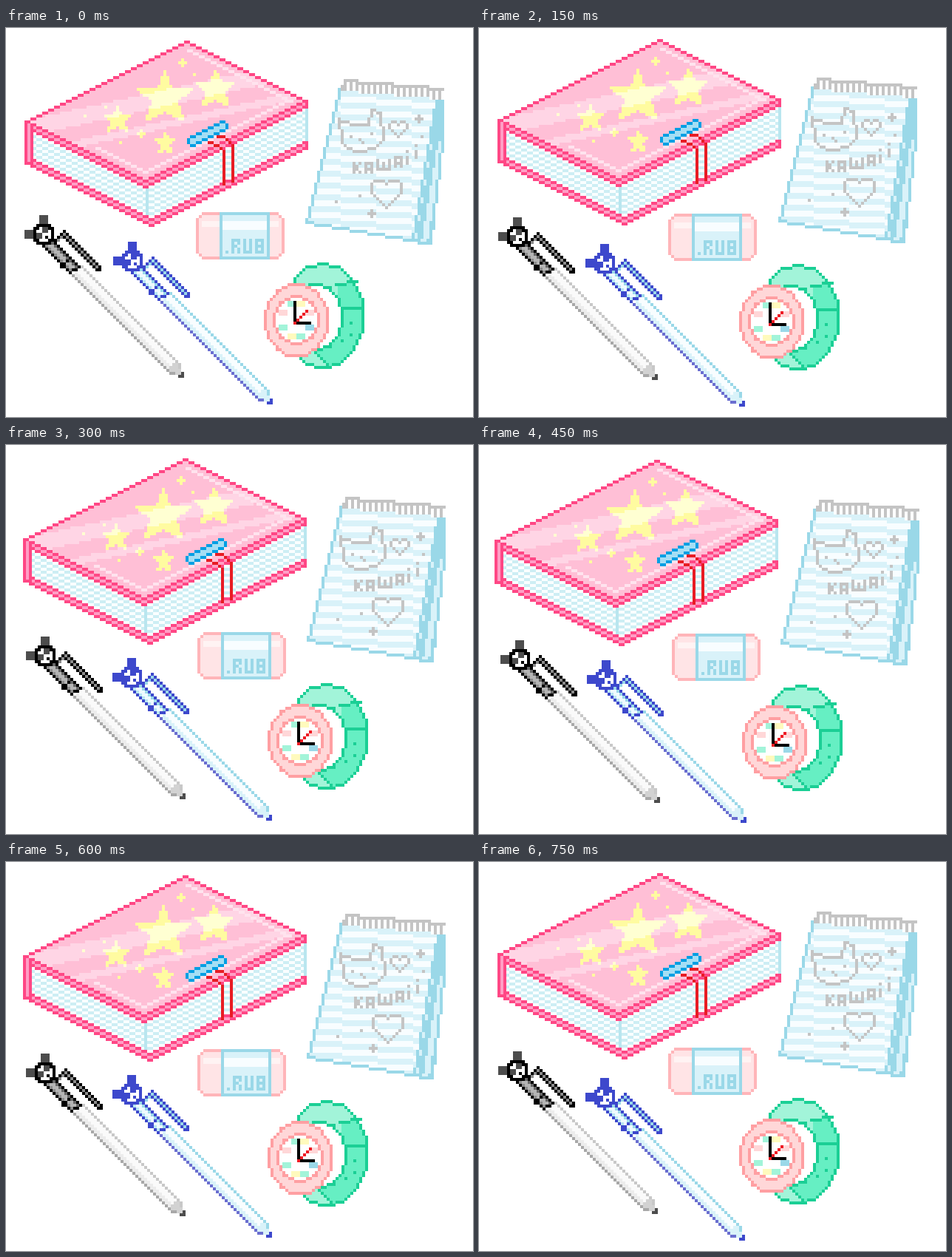
Animation of 632 by 526 pixels, one loop 0.9 s. Source, as an HTML page with a canvas:

```html
<!DOCTYPE html>
<html lang="en">
<head>
<meta charset="utf-8">
<title>Pixel stationery</title>
<style>
  html, body { margin: 0; width: 100%; height: 100%; overflow: hidden; background: #fff; }
  canvas { display: block; }
</style>
</head>
<body>
<canvas id="stage" width="632" height="526"></canvas>
<script>
const CELL = 4, STEP = 150;
const ORDER = [0, 1, 2, 3, 2, 1];
const SKY = '#9ad8e8', ICE = '#d9f2f9', SNOW = '#f8fdff';

const pairs = list => {
  const out = [];
  for (let i = 0; i < list.length; i += 2) out.push([list[i], list[i + 1]]);
  return out;
};

const inside = (pts, x, y) => {
  let hit = false;
  for (let i = 0, j = pts.length - 1; i < pts.length; j = i++) {
    const [ax, ay] = pts[i], [bx, by] = pts[j];
    if ((ay > y) !== (by > y) && x < (bx - ax) * (y - ay) / (by - ay) + ax) hit = !hit;
  }
  return hit;
};

// A grid of coloured cells with simple drawing tools.
class Sprite {
  constructor(w, h) {
    this.w = w;
    this.h = h;
    this.cells = Array.from({ length: h }, () => Array(w).fill(null));
  }
  set(x, y, c) {
    if (x >= 0 && y >= 0 && x < this.w && y < this.h) this.cells[y][x] = c;
  }
  // Gives every cell a new colour from its place and present colour.
  map(rule) {
    this.cells.forEach((row, y) => row.forEach((c, x) => { row[x] = rule(x, y, c); }));
  }
  rect(x, y, w, h, c) {
    for (let j = 0; j < h; j++) for (let i = 0; i < w; i++) this.set(x + i, y + j, c);
  }
  line(x0, y0, x1, y1, c) {
    const n = Math.max(Math.abs(x1 - x0), Math.abs(y1 - y0), 1);
    for (let i = 0; i <= n; i++) {
      this.set(Math.round(x0 + (x1 - x0) * i / n), Math.round(y0 + (y1 - y0) * i / n), c);
    }
  }
  path(list, c, dx = 0, dy = 0) {
    const p = pairs(list);
    for (let i = 1; i < p.length; i++) {
      this.line(p[i - 1][0] + dx, p[i - 1][1] + dy, p[i][0] + dx, p[i][1] + dy, c);
    }
  }
  poly(list, fill, stroke) {
    const pts = pairs(list);
    this.map((x, y, c) => !inside(pts, x, y) ? c : typeof fill === 'function' ? fill(x, y) : fill);
    if (stroke) this.path([...list, list[0], list[1]], stroke);
  }
  // A ring of n points; the radius factor may vary from point to point.
  ring(n, cx, cy, rx, ry, fill, stroke, factor = () => 1) {
    const list = [];
    for (let i = 0; i < n; i++) {
      const a = 2 * Math.PI * i / n - Math.PI / 2, k = factor(i);
      list.push(Math.round(cx + rx * k * Math.cos(a)), Math.round(cy + ry * k * Math.sin(a)));
    }
    this.poly(list, fill, stroke);
  }
  ellipse(cx, cy, rx, ry, fill, stroke) {
    this.ring(48, cx, cy, rx, ry, fill, stroke);
  }
  star(cx, top, r, c) {
    this.ring(10, cx, top + r * 0.95, r, r * 0.95, c, c, i => i % 2 ? 0.42 : 1);
  }
  plus(x, y, c) {
    this.rect(x - 1, y, 3, 1, c);
    this.rect(x, y - 1, 1, 3, c);
  }
  // Two cells across for each cell down.
  iso(x, y, dir, n, c) {
    for (let i = 0; i < n; i++) this.rect(x + 2 * i * dir, y + i, 2, 1, c);
  }
  bake() {
    const cv = document.createElement('canvas');
    cv.width = this.w * CELL;
    cv.height = this.h * CELL;
    const g = cv.getContext('2d');
    this.cells.forEach((row, y) => row.forEach((c, x) => {
      if (!c) return;
      g.fillStyle = c;
      g.fillRect(x * CELL, y * CELL, CELL, CELL);
    }));
    return cv;
  }
}

const GLYPHS = {
  K: [[0, 0, 0, 3], [2, 0, 0, 2], [1, 2, 2, 3]],
  A: [[0, 3, 0, 0, 2, 0, 2, 3], [0, 2, 2, 2]],
  W: [[0, 0, 0, 3, 4, 3, 4, 0], [2, 1, 2, 3]],
  i: [[0, 0, 0, 0], [0, 2, 0, 4]],
  R: [[0, 4, 0, 0, 2, 0, 2, 1], [0, 2, 1, 2], [2, 3, 2, 4]],
  U: [[0, 0, 0, 4, 2, 4, 2, 0]],
  B: [[0, 0, 0, 4, 2, 4, 2, 0, 0, 0], [0, 2, 2, 2]],
  '.': [[0, 4, 0, 4]]
};
const letter = (s, ch, x, y, c) => GLYPHS[ch].forEach(p => s.path(p, c, x, y));

function book() {
  const s = new Sprite(96, 63);
  const edge = '#ff4785', mid = '#ff9ec5', pink = '#ffbfd6', light = '#ffd5e5', rim = '#ffe3ee';
  const yellow = '#fffba0', pale = '#ffffd2', red = '#e81c24', blue = '#009fe3';
  const pages = dir => (x, y) => (y + dir * Math.floor(x / 2)) & 1 ? '#cdeef4' : '#fafeff';

  s.poly([3, 29, 42, 48, 42, 62, 3, 42], pages(-1));
  s.poly([42, 48, 96, 21, 96, 35, 42, 62], pages(1));
  s.rect(41, 50, 1, 10, '#b9e6ef');
  s.rect(95, 23, 1, 11, '#b9e6ef');

  s.poly([54, 0, 95, 20, 41, 48, 0, 27], pink);
  s.star(47, 10, 9.4, yellow);
  s.star(64, 10, 6.4, yellow);
  s.star(31, 22, 4.5, yellow);
  s.star(47, 31, 3.5, yellow);
  s.plus(53, 7, yellow);
  s.plus(39, 31, yellow);
  pairs([57, 11, 27, 22, 20, 25, 32, 34]).forEach(([x, y]) => s.set(x, y, yellow));

  s.map((x, y, c) => {
    const v = y + 0.22 * x;
    const shiny = v > 26.5 && v < 32 || v > 37 && v < 39.5;
    return !shiny ? c : c === pink ? light : c === yellow ? pale : c;
  });
  s.iso(55, 3, 1, 18, rim);
  s.iso(88, 20, -1, 25, rim);
  s.iso(24, 36, 1, 9, rim);

  s.iso(54, 0, -1, 28, edge);
  s.iso(54, 0, 1, 21, edge);
  const cover = (left, right, n) => {
    for (const k of [1, 0, 2]) {
      const c = k === 1 ? mid : edge;
      s.iso(0, left + k, 1, n, c);
      s.iso(94, right + k, -1, 49 - n, c);
    }
    s.rect(95, right, 1, 3, edge);
  };
  cover(27, 20, 21);
  cover(39, 34, 22);
  s.rect(0, 27, 1, 15, edge);
  s.rect(1, 28, 1, 13, mid);
  s.rect(2, 29, 1, 13, edge);

  s.path([61, 33, 65, 35, 67, 37, 67, 48], red);
  s.path([65, 32, 67, 32, 70, 35, 70, 47], red);
  for (let k = 0; k < 4; k++) {
    for (let i = 0; i < 6; i++) s.rect(66 - 2 * i, 27 + k + i, 2, 1, k % 3 ? '#a5def4' : blue);
  }
  s.rect(55, 33, 1, 2, blue);
  s.rect(68, 28, 1, 2, blue);
  return s;
}

function notepad() {
  const s = new Sprite(47, 56);
  const grey = '#c4c4c4';
  const heart = (x, y, k) => s.path([
    0, 1, 1, 0, k - 1, 0, k, 1, k + 1, 0, 2 * k - 1, 0, 2 * k, 1,
    2 * k, k - 1, k, 2 * k - 1, 0, k - 1, 0, 1], grey, x, y);

  s.poly([44, 6, 46, 6, 46, 20, 42, 55, 38, 55, 36, 54],
    (x, y) => y > 20 && (x + Math.floor(y / 6)) % 4 < 2 ? ICE : SKY);
  s.path([46, 6, 46, 20, 42, 55, 38, 55], SKY);
  s.poly([12, 3, 44, 6, 36, 54, 0, 48],
    (x, y) => (y + 1 - Math.floor(x / 12) + 60) % 4 < 2 ? ICE : SNOW);
  for (let y = 3; y < 49; y++) s.set(Math.max(0, 11 - Math.floor((y - 3) / 4)), y, SKY);
  s.path([0, 48, 36, 54, 44, 7], SKY);

  for (let x = 13; x < 47; x++) {
    const top = Math.floor((x - 6) / 12);
    s.rect(x, top, 1, 4, x % 2 ? grey : '#fff');
    s.set(x, top, grey);
  }
  s.path([12, 3, 13, 0], grey);

  s.path([11, 13, 12, 21, 14, 23, 18, 24, 23, 23, 26, 20, 25, 11,
    22, 10, 21, 15, 16, 15, 13, 14, 11, 13], grey);
  pairs([15, 19, 22, 18, 18, 20, 19, 21]).forEach(([x, y]) => s.set(x, y, grey));
  heart(28, 14, 3);
  heart(22, 34, 5);
  s.plus(38, 13, grey);
  s.plus(22, 45, grey);
  pairs([39, 19, 10, 41, 18, 39]).forEach(([x, y]) => s.set(x, y, grey));

  let pen = 16;
  [...'KAWAii'].forEach((ch, i) => {
    letter(s, ch, pen, Math.round(28.4 - i * i / 4), grey);
    pen += { W: 6, i: 3 }[ch] || 4;
  });
  return s;
}

function eraser() {
  const s = new Sprite(30, 16);
  s.poly([2, 0, 27, 0, 29, 2, 29, 13, 27, 15, 2, 15, 0, 13, 0, 2], '#ffe4e6', '#ffb5b9');
  s.rect(2, 3, 26, 2, '#fff3f3');
  s.rect(8, 0, 17, 16, SKY);
  s.rect(9, 1, 15, 14, ICE);
  s.rect(9, 3, 15, 3, SNOW);
  [...'.RUB'].forEach((ch, i) => letter(s, ch, i ? 8 + 4 * i : 10, 9, SKY));
  return s;
}

function watch() {
  const s = new Sprite(34, 36);
  const green = '#1bcf95', mint = '#a2f4d9', leaf = '#66efc3';
  const rose = '#ff9fa2', blush = '#ffd7d8', cream = '#fffabd';

  s.ellipse(19.5, 17.5, 13.5, 17.4, leaf, green);
  s.map((x, y, c) => c === leaf && (y < 7 || x < 25 && y < 18 || x - y < -12) ? mint : c);
  s.ellipse(17, 18, 9, 11, '#fff', green);
  s.path([24, 7, 31, 6], green);
  s.path([26, 15, 33, 15], green);
  s.path([17, 30, 22, 35], green);
  pairs([29, 20, 29, 24, 26, 26]).forEach(([x, y]) => s.set(x, y, green));

  s.ellipse(10.5, 19, 10.5, 12, blush, rose);
  s.ellipse(10.5, 19, 7.5, 8, '#fff', rose);
  [cream, blush, SKY, mint, cream, mint, blush, mint].forEach((c, i) => {
    const a = (i + 0.5) * Math.PI / 4;
    s.rect(Math.round(9.5 + 5 * Math.sin(a)), Math.round(18.5 - 5.5 * Math.cos(a)), 3, 2, c);
  });
  s.rect(10, 13, 1, 8, '#000');
  s.rect(10, 20, 6, 1, '#000');
  s.line(10, 20, 14, 16, '#ee1c24');
  return s;
}

function pen(ink) {
  const s = new Sprite(54, 55);
  // Barrel: a diagonal band that narrows to the tip.
  s.map((x, y) => {
    const along = x + y, off = x - y + 1, half = Math.min(3, (108 - along) / 2);
    if (along < 36 || along > 107 || Math.abs(off) > half) return null;
    if (along > 105) return ink.tip;
    if (off > half - 1) return ink.top;
    if (off < 1 - half) return ink.low;
    return along > 99 ? ink.nib : off < 0 ? ink.shade : ink.body;
  });

  s.poly([9, 8, 18, 17, 15, 19, 6, 10],
    (x, y) => x - y > -1 ? ink.grip : x - y > -3 ? ink.gloss : ink.grip2, ink.line);
  s.line(15, 14, 12, 17, ink.line);

  for (let i = 0; i < 12; i++) {
    s.set(13 + i, 5 + i, ink.line);
    s.set(13 + i, 6 + i, ink.clip);
    s.set(13 + i, 7 + i, ink.line);
  }
  s.line(10, 8, 13, 5, ink.line);
  s.line(11, 8, 12, 7, ink.clip);
  s.rect(25, 17, 1, 2, ink.line);

  s.ellipse(6, 6, 3.2, 3.2, '#fff', ink.line);
  s.rect(5, 0, 3, 3, ink.ear);
  s.rect(0, 5, 3, 3, ink.ear);
  s.rect(4, 6, 2, 2, ink.ear);
  s.rect(6, 4, 2, 2, ink.ear);
  s.set(7, 7, ink.line);
  return s;
}

const BLACK = {
  top: '#c8c8c8', low: '#a8a8a8', body: '#fafafa', shade: '#ececec', nib: '#d2d2d2', tip: '#4d4d4d',
  grip: '#666666', gloss: '#b5b5b5', grip2: '#8c8c8c', line: '#000000', clip: '#8c8c8c', ear: '#4d4d4d'
};
const BLUE = {
  top: SKY, low: '#6a6ed0', body: SNOW, shade: ICE, nib: ICE, tip: '#3d48cc',
  grip: SKY, gloss: '#eefaff', grip2: '#b8e6f2', line: '#3d48cc', clip: SKY, ear: '#3d48cc'
};

// Start corner, then the shift from it in each of the four poses.
const items = [
  [book(), 25, 17, [0, 0, 0, -2, -2, 1, -4, 3]],
  [notepad(), 405, 69, [0, 0, 0, -2, 2, 1, 3, 5]],
  [eraser(), 257, 249, [0, 0, -1, 2, 2, 4, 4, 6]],
  [watch(), 349, 317, [0, 0, 3, 2, 5, 5, 7, 7]],
  [pen(BLACK), 25, 253, [0, 0, 1, 3, 2, 6, 4, 11]],
  [pen(BLUE), 145, 289, [0, 0, -1, 3, -1, -1, 1, 2]]
].map(([sprite, x, y, shift]) => ({ image: sprite.bake(), x, y, shift: pairs(shift) }));

const ctx = document.getElementById('stage').getContext('2d');
const start = performance.now();

function draw() {
  const t = Math.max(0, performance.now() - start);
  const pose = ORDER[Math.floor(t / STEP) % ORDER.length];
  ctx.fillStyle = '#fff';
  ctx.fillRect(0, 0, 632, 526);
  for (const { image, x, y, shift } of items) {
    const [dx, dy] = shift[pose];
    ctx.drawImage(image, x + dx, y + dy);
  }
  requestAnimationFrame(draw);
}
draw();
</script>
</body>
</html>
```
